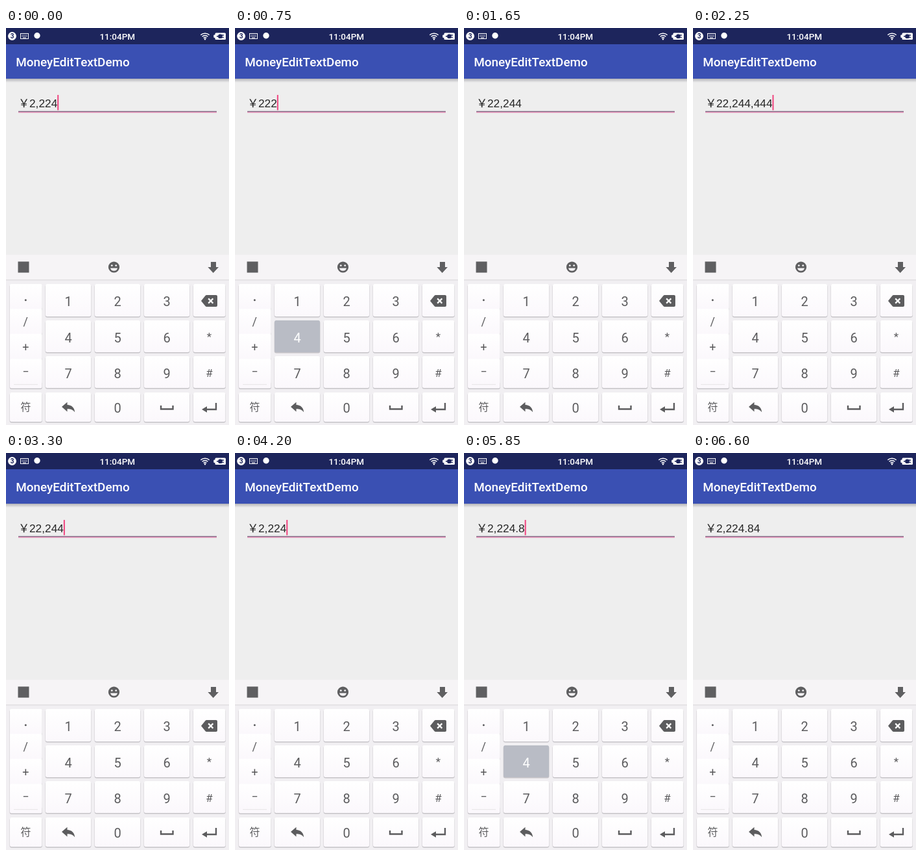
An HTML page that plays this animation: 344x611 px, repeating every 6750 ms.

```html
<!DOCTYPE html>
<html lang="en">
<head>
<meta charset="utf-8">
<title>Money input</title>
<style>
  html, body { margin: 0; height: 100%; overflow: hidden; background: #eee; }
  svg { display: block; width: 100%; height: 100%; }
  text { font-family: Roboto, sans-serif; }
  .cjk { font-family: "Noto Sans CJK SC", "Noto Sans CJK", sans-serif; }
  #amount { font-family: "Liberation Sans", Arial, sans-serif; }
  .key { fill: #5c5c5e; stroke: #5c5c5e; }
  .key text { text-anchor: middle; stroke: none; }
  .key .face { fill: url(#face); stroke: none; }
  .key .shade { fill: #c6c4c8; stroke: none; }
  .key .mark { stroke: none; }
  .key .line { fill: none; stroke-width: 2.4; }
  .key .cross { fill: none; stroke: #fff; stroke-width: 2.2; }
  .key.down { fill: #fff; stroke: #fff; }
  .key.down .face { fill: #b9bcc5; }
  .key.down .cross { stroke: #b9bcc5; }
</style>
</head>
<body>
<svg viewBox="0 0 344 611" preserveAspectRatio="none">
  <defs>
    <linearGradient id="face" x2="0" y2="1">
      <stop stop-color="#fff"/><stop offset="1" stop-color="#fbf8fc"/>
    </linearGradient>
    <linearGradient id="drop" x2="0" y2="1">
      <stop stop-color="#b4b4b8"/><stop offset="1" stop-color="#eee"/>
    </linearGradient>
  </defs>
  <rect width="344" height="611" fill="#eee"/>

  <!-- status bar -->
  <rect width="344" height="25" fill="#1d255c"/>
  <g fill="#fff">
    <circle cx="9.5" cy="12.5" r="6.4"/>
    <text x="9.5" y="16.2" font-size="10" font-weight="700" text-anchor="middle" fill="#1d255c">3</text>
    <rect x="22.5" y="8.5" width="12" height="8" fill="none" stroke="#fff"/>
    <path d="M24.5 11h8M24.5 13h8" stroke="#fff" stroke-dasharray="1.2 1"/>
    <path d="M26 15h5" stroke="#fff"/>
    <circle cx="48" cy="11.8" r="4.7"/>
    <text x="171.8" y="17.6" font-size="13.5" font-weight="500" text-anchor="middle">11:04PM</text>
    <path d="M300.3 10.8a9.8 9.8 0 0 1 13.4 0M302.6 13.3a6.4 6.4 0 0 1 8.8 0M304.8 15.6a3.2 3.2 0 0 1 4.4 0" fill="none" stroke="#fff" stroke-width="1.5"/>
    <circle cx="307" cy="17.2" r="1.2"/>
    <rect x="320.3" y="10.5" width="3" height="4.5" rx="1"/>
    <rect x="322.5" y="7.5" width="16.5" height="10.5" rx="1.5"/>
    <path d="M325 12.7h3M333 11h3M333 14.4h3" stroke="#1d255c" stroke-width="1.4"/>
    <rect x="327.3" y="9.4" width="6.4" height="6.7" rx="2.6" fill="#1d255c"/>
  </g>

  <!-- app bar -->
  <rect y="25" width="344" height="53" fill="#3a50b3"/>
  <rect y="78" width="344" height="6" fill="url(#drop)"/>
  <text x="15.2" y="59" font-size="18.9" font-weight="500" fill="#fff">MoneyEditTextDemo</text>

  <!-- input -->
  <text class="cjk" x="18.9" y="122" font-size="17.3" fill="#252525">￥</text>
  <text id="amount" x="36" y="121.8" font-size="17.3" fill="#252525"></text>
  <rect x="19" y="127.8" width="306" height="1.3" fill="#7d6f86"/>
  <rect x="19" y="129.1" width="306" height="1.3" fill="#dc7fab"/>
  <rect id="caret" y="103" width="2" height="23.5" fill="#f0447f"/>

  <!-- keyboard -->
  <rect y="349" width="344" height="39" fill="#f6f4f6"/>
  <rect y="388" width="344" height="223" fill="#f1eff2"/>
  <rect y="387" width="344" height="1.5" fill="#e1dfe2"/>
  <g fill="#5f5f61">
    <rect x="18.5" y="359.5" width="17" height="17"/>
    <circle cx="166.5" cy="368" r="8.6"/>
    <path d="M316 360h8v8h4l-8.3 9-8.3-9h4.6z"/>
  </g>
  <g fill="#f6f4f6">
    <circle cx="163.3" cy="365.6" r="1.4"/><circle cx="169.7" cy="365.6" r="1.4"/>
    <path d="M161 369.5h11a5.6 5.2 0 0 1-11 0z"/>
  </g>
  <g id="keys"></g>
</svg>
<script>
const $ = id => document.getElementById(id);
const cols = [[6, 49.5], [61, 70], [137, 70], [213, 70], [289, 49.5]];
const rows = [[394, 50], [450, 49], [505, 49], [561, 45]];

const label = (x, y, s, size = 20, cls = '') =>
  `<text class="${cls}" x="${x}" y="${y}" font-size="${size}">${s}</text>`;

const box = (x, y, w, h) =>
  `<rect class="shade" x="${x - .4}" y="${y + .8}" width="${w + .8}" height="${h + .8}" rx="3"/>
   <rect class="face" x="${x}" y="${y}" width="${w}" height="${h}" rx="2.5"/>`;

const group = (name, body) => `<g class="key" data-key="${name}">${body}</g>`;

function key(name, c, r, body) {
  const [x, w] = cols[c], [y, h] = rows[r];
  return group(name, box(x, y, w, h) + body);
}

let html = group('side', box(6, 394, 49.5, 160.5));
['.', '/', '+', '−'].forEach((s, i) => {
  const y = 394 + i * 38.4;
  const face = `<rect class="face" x="6" y="${y}" width="49.5" height="38.4" rx="2.5"/>`;
  const mark = i ? label(30.3, y + 26, s, 18) : '<circle class="mark" cx="30.3" cy="418.7" r="1.5"/>';
  html += group(s, face + mark) +
    `<rect x="12" y="${y + 39}" width="37" height="1" fill="#e6e4e7"/>`;
});
for (let n = 1; n < 10; n++) {
  const c = (n - 1) % 3 + 1, r = Math.floor((n - 1) / 3);
  html += key(n, c, r, label(cols[c][0] + 35, rows[r][0] + 34, n));
}
html += key('0', 2, 3, label(172, 592, 0))
  + key('del', 4, 0, `<path class="mark" d="M301 420l6.5-8q.8-1 2-1h14.5q2 0 2 2v14q0 2-2 2h-14.5q-1.2 0-2-1z"/>
      <path class="cross" d="M312.2 416.4l7.2 7.2m0-7.2l-7.2 7.2"/>`)
  + key('*', 4, 1, label(313.5, 481, '*', 17))
  + key('#', 4, 2, label(313.5, 536.5, '#', 17))
  + key('sym', 0, 3, label(30.5, 589, '符', 16, 'cjk'))
  + key('back', 1, 3, '<path class="mark" d="M86 583l8.5-7.3v4.3c7 .3 11 4.300 11.700 11.300c-3-4-6.700-5-11.700-5v4.200z"/>')
  + key('space', 3, 3, '<path class="line" d="M239 581v5.500h18.500v-5.500"/>')
  + key('enter', 4, 3, `<path class="line" d="M324 577v10h-16"/>
      <path class="mark" d="M302 587l8-4.700v9.400z"/>`);
$('keys').innerHTML = html;

// start time, amount, caret shown, pressed key
const steps = [
  [0, '2224', 1], [150, '222', 1],
  [750, '222', 1, '4'], [900, '2224', 1], [1050, '2224', 1, '4'], [1200, '22244', 1],
  [1650, '22244', 0], [1800, '22244', 0, '4'], [1950, '222444', 1],
  [2100, '2224444', 1, '4'], [2250, '22244444', 1],
  [2850, '22244444', 0], [3000, '2224444', 1], [3150, '222444', 1], [3300, '22244', 1],
  [3900, '22244', 0], [4050, '22244', 0, 'del'], [4200, '2224', 1],
  [4950, '2224', 0], [5100, '2224', 0, '.'], [5250, '2224.', 1],
  [5550, '2224.', 1, '8'], [5700, '2224.8', 1], [5850, '2224.8', 1, '4'],
  [6000, '2224.84', 1], [6600, '2224.84', 0]
];
const LOOP = 6750;
const keys = document.querySelectorAll('.key');
const amount = $('amount'), caret = $('caret');
let shown;

function group3(s) {
  const [whole, ...cents] = s.split('.');
  return [whole.replace(/\B(?=(\d{3})+$)/g, ','), ...cents].join('.');
}

function draw(now) {
  const t = now % LOOP;
  const step = steps.findLast(s => s[0] <= t);
  if (step !== shown) {
    shown = step;
    const [, value, blink, pressed] = step;
    amount.textContent = group3(value);
    caret.setAttribute('x', 36 + amount.getComputedTextLength());
    caret.setAttribute('visibility', blink ? 'visible' : 'hidden');
    keys.forEach(k => k.classList.toggle('down', k.dataset.key === pressed));
  }
}

const start = performance.now();
function tick() {
  draw(performance.now() - start);
  requestAnimationFrame(tick);
}
tick();
</script>
</body>
</html>
```
